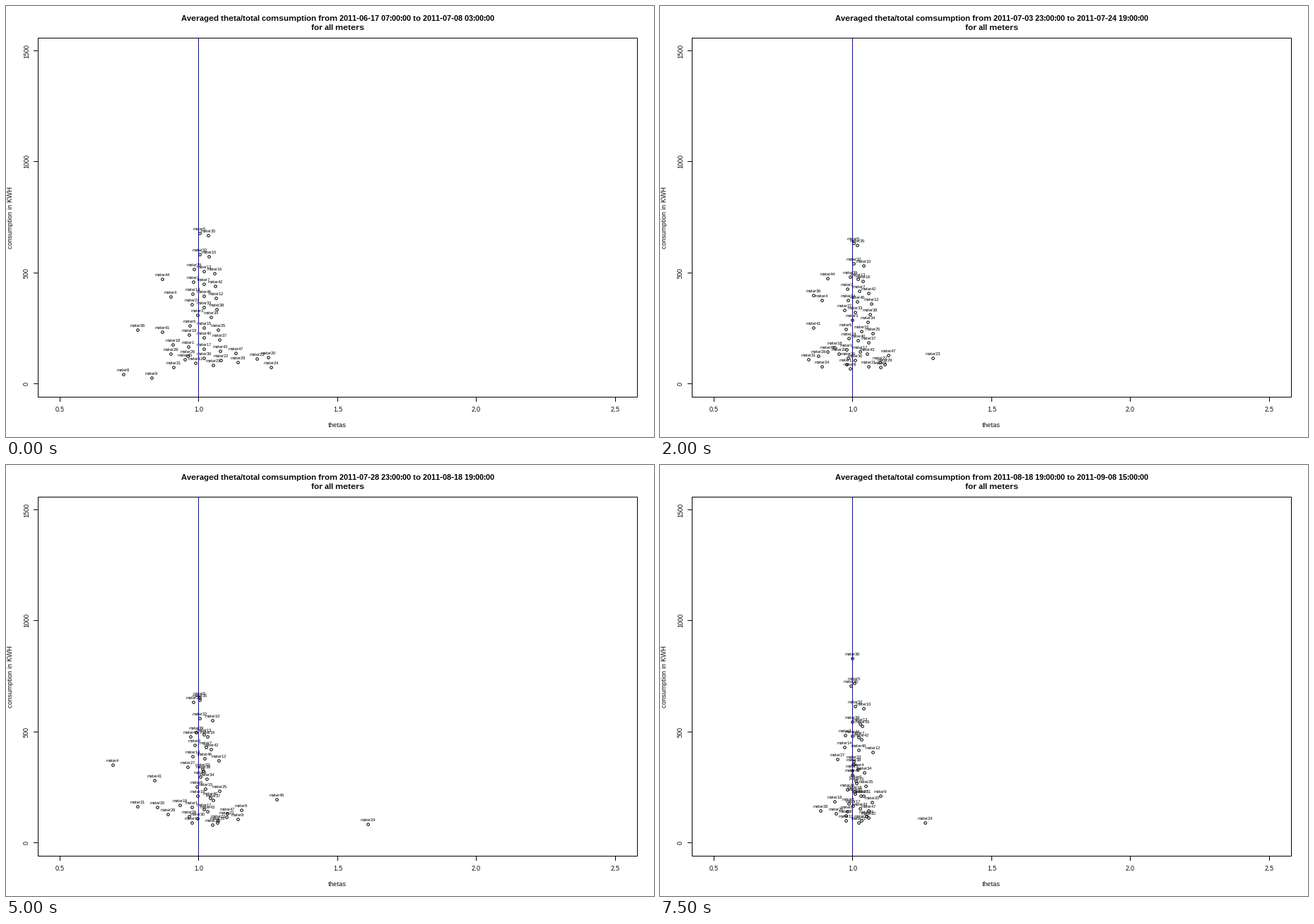
Write a matplotlib script that moves like this. It is 917 px wide and 611 px high and loops after 8 s.

```python
import numpy as np
import matplotlib.pyplot as plt
from matplotlib.animation import FuncAnimation

W, H, DPI = 917, 611, 100
STEPS, STEP_MS = 16, 500
PX = 72 / DPI                      # one pixel in points
LEFT, TOP, RIGHT, BOTTOM = 45, 45, 893, 554

plt.rcParams.update({"font.family": "Liberation Sans",
                     "text.hinting": "native", "text.hinting_factor": 1})
fig = plt.figure(figsize=(W / DPI, H / DPI), dpi=DPI, facecolor="white")
ax = fig.add_axes([0, 0, 1, 1])
ax.set_xlim(0, W)
ax.set_ylim(H, 0)
ax.axis("off")


def line(xs, ys, color="black"):
    ax.plot(np.add(xs, .5), np.add(ys, .5), color=color, lw=PX, snap=False,
            solid_capstyle="projecting", solid_joinstyle="miter")


def text(x, y, s, px, **kw):
    return ax.text(x, y, s, fontsize=px * PX, ha="center", va="baseline",
                   rotation_mode="anchor", **kw)


def theta_px(theta):
    return 272.5 + (theta - 1) * 393


def kwh_px(kwh):
    return 535.5 - kwh * .3147


# The steady meters, from high to low use; each row runs from low to high theta.
ROWS = ["5 35", "32 10", "39 13 16", "2 7 42", "14 46 12", "27 33 38", "3 34",
        "6 15 25", "19 40 37", "18 1 17 43 47", "28 26 30 22 29", "11 21"]

# The wandering meters: first and last use, then theta at a few steps.
WANDERERS = {
    36: (242, 831, {0: .78, 10: .98, 15: 1}),
    31: (75, 210, {0: .91, 1: .56, 4: .84, 8: .45, 10: .78, 15: 1.04}),
    4: (392, 332, {0: .9, 4: .89, 6: .73, 10: .69, 15: 1.02}),
    24: (75, 90, {0: 1.26, 1: 1.1, 4: .89, 10: 1.61, 15: 1.26}),
    45: (110, 240, {0: .95, 4: .91, 6: .76, 10: 1.28, 13: 1.28, 15: .98}),
    23: (113, 119, {0: 1.21, 1: 1.34, 4: 1.29, 10: 1.1, 15: 1.05}),
    8: (43, 140, {0: .73, 4: .99, 10: 1.14, 15: .98}),
    9: (27, 210, {0: .83, 1: .81, 4: 1.1, 13: 1.18, 15: 1.1}),
    20: (119, 183, {0: 1.25, 4: .95, 10: .85, 15: 1.07}),
    41: (234, 307, {0: .87, 10: .84, 15: 1}),
    44: (472, 481, {0: .87, 10: .97, 15: 1}),
}

rng = np.random.default_rng(7)
steps = np.arange(STEPS)
season = 1 - .08 * np.sin(np.pi * steps / 12)   # summer dip, then a rise
narrow = 1 - .4 * steps / (STEPS - 1)           # the cloud closes in
tracks = {}

for r, row in enumerate(ROWS):
    names = row.split()
    for i, name in enumerate(names):
        offset = (i - (len(names) - 1) / 2) * (.03 + .003 * r)
        walk = np.cumsum(rng.normal(0, .003 + .0005 * r, STEPS))
        use = 680 - 585 * (r / 11) ** .75 - 10 * i
        tracks[int(name)] = 1.02 + offset * narrow + walk - walk[0], use * season

for meter, (first, last, keys) in WANDERERS.items():
    tracks[meter] = (np.interp(steps, list(keys), list(keys.values())),
                     np.linspace(first, last, STEPS))

METERS = sorted(tracks)

# Frame, axes and the theta = 1 line
line([LEFT, RIGHT, RIGHT, LEFT, LEFT], [TOP, TOP, BOTTOM, BOTTOM, TOP])
for theta in (.5, 1, 1.5, 2, 2.5):
    x = int(theta_px(theta))
    line([x, x], [BOTTOM, BOTTOM + 6])
    text(x + .5, 575, f"{theta:.1f}", 9)
for kwh in (0, 500, 1000, 1500):
    y = int(kwh_px(kwh))
    line([LEFT - 6, LEFT], [y, y])
    text(32, y + .5, str(kwh), 9, rotation=90)
line([272, 272], [TOP + 1, BOTTOM - 1], "blue")
text(469, 597, "thetas", 9)
text(9, 299.5, "consumption in KWH", 9, rotation=90)
title = text(469, 21, "", 11, weight="bold")
text(469, 34, "for all meters", 11, weight="bold")

dots = ax.scatter([0] * len(METERS), [0] * len(METERS), s=(3.6 * PX) ** 2,
                  facecolors="none", edgecolors="black", linewidths=PX,
                  snap=False)
labels = [text(0, 0, f"meter{m}", 6) for m in METERS]

START = np.datetime64("2011-06-17T07:00:00")


def stamp(hours):
    return str(START + np.timedelta64(hours, "h")).replace("T", " ")


def draw(step):
    theta, kwh = np.array([[t[step], k[step]]
                           for t, k in map(tracks.get, METERS)]).T
    spots = np.column_stack([np.rint(theta_px(theta)), np.rint(kwh_px(kwh))])
    dots.set_offsets(spots + .5)
    for label, (x, y) in zip(labels, spots):
        label.set_position((x, y - 4))
    begin = 100 * int(step)
    title.set_text(f"Averaged theta/total comsumption from {stamp(begin)}"
                   f" to {stamp(begin + 500)}")
    return [dots, title, *labels]


anim = FuncAnimation(fig, draw, frames=STEPS, interval=STEP_MS,
                     repeat=True, repeat_delay=0, blit=False)
plt.show()
```
